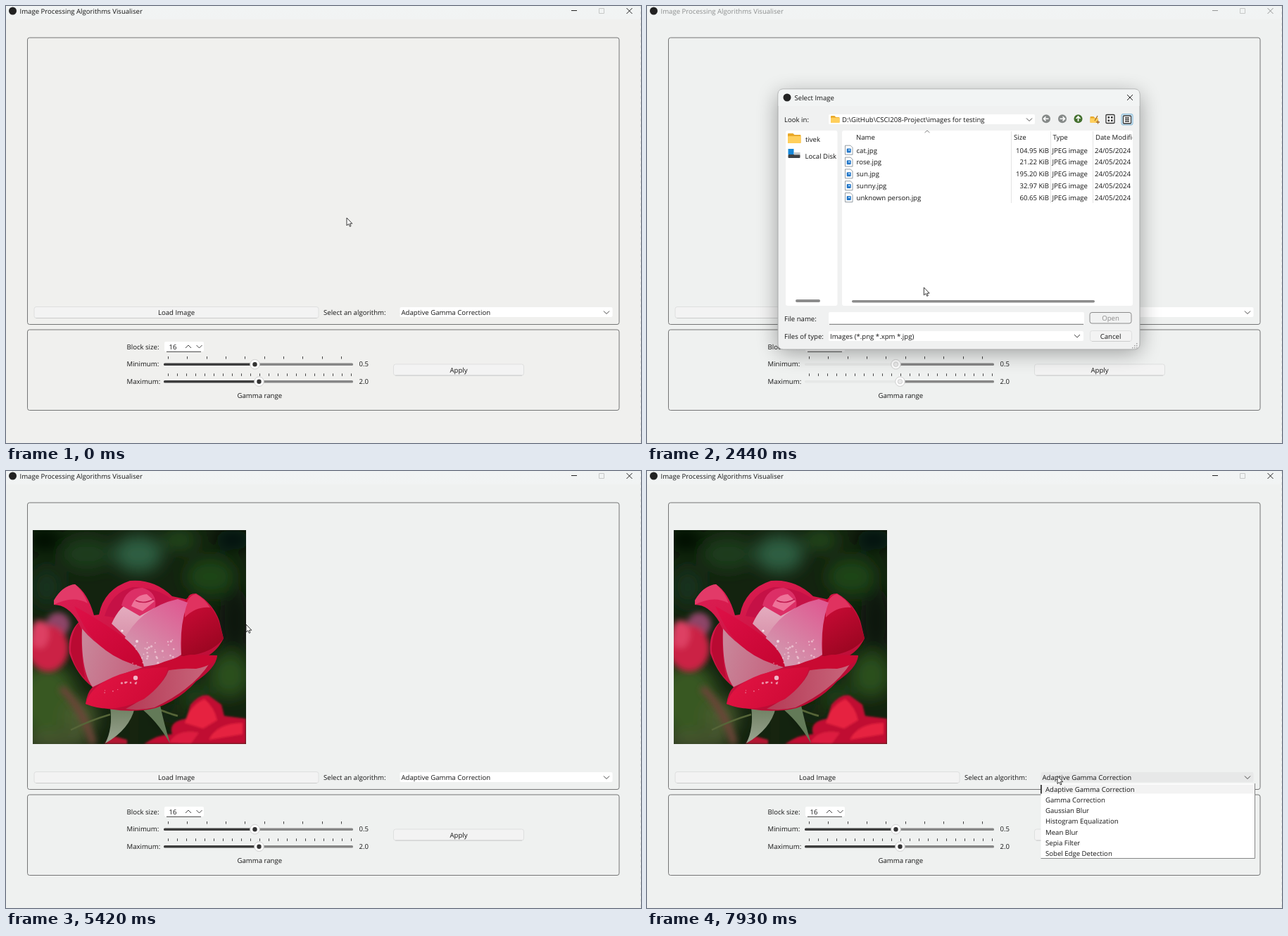
Recreate the animation shown at these times as an HTML page. Size 902 by 621 pixels, loop 8 s.

```html
<!DOCTYPE html>
<html lang="en">
<head>
<meta charset="utf-8">
<title>Image Processing Algorithms Visualiser</title>
<style>
html, body { margin: 0; width: 100%; height: 100%; overflow: hidden; background: #eff1f0; }
svg { display: block; width: 100%; height: 100%; }
text { font-family: "Open Sans", "Noto Sans", sans-serif; font-size: 9.6px; fill: #161616; text-rendering: geometricPrecision; white-space: pre; }
</style>
</head>
<body>
<svg id="stage" viewBox="0 0 902 621"></svg>
<script>
const LOOP = 8000;
const stage = document.getElementById('stage');

// Markup helpers
const text = (x, y, s, extra = '') => `<text x="${x}" y="${y}" ${extra}>${s}</text>`;
const centred = (x, y, s, extra = '') => text(x, y, s, `text-anchor="middle" ${extra}`);
const rect = (x, y, w, h, fill, extra = '') =>
  `<rect x="${x}" y="${y}" width="${w}" height="${h}" fill="${fill}" ${extra}/>`;
const circle = (x, y, r, fill, extra = '') => `<circle cx="${x}" cy="${y}" r="${r}" fill="${fill}" ${extra}/>`;
const shape = (d, fill, extra = '') => `<path d="${d}" fill="${fill}" ${extra}/>`;
const line = (d, stroke, width = 1, extra = '') =>
  `<path d="${d}" fill="none" stroke="${stroke}" stroke-width="${width}" ${extra}/>`;
const chevron = (x, y, dir = 1) => line(`M${x - 4} ${y - 2 * dir}l4 ${4 * dir}l4 ${-4 * dir}`, '#3c3c3c', .95);
const cross = (x, y) => line(`M${x - 4} ${y - 4}l8 8m0-8l-8 8`, 'currentColor', 1);
const button = (x, y, w, h, id = '') =>
  rect(x + .5, y + .5, w - 1, h - 1, '#f3f3f3', `rx="3" stroke="#dedfdf" ${id}`) +
  line(`M${x + 3} ${y + h - .5}h${w - 6}`, '#cbcccc');
const folder = (x, y, w, h) =>
  shape(`M${x} ${y + 1}q0-1 1-1h${w * .35}l2 2h${w * .65 - 4}q1 0 1 1v${h - 4}q0 1-1 1h${2 - w}q-1 0-1-1z`, '#e9a92a') +
  rect(x, y + h * .28, w, h * .72, '#ffcf5c', 'rx="1"');

function slider(y, thumb, tickY, count, step) {
  let ticks = '';
  for (let i = 0; i < count; i++) ticks += `M${Math.round(230 + i * step) + .5} ${tickY}v3.6`;
  return line(ticks, '#444') +
    rect(thumb, y - 1.7, 493 - thumb, 3.4, '#868686', 'rx="1.5"') +
    rect(224, y - 1.7, thumb - 224, 3.4, '#3d3d3d', 'rx="1.5" class="track"') +
    circle(thumb, y, 6.8, '#fdfdfd', 'stroke="#cfcfcf"') +
    circle(thumb, y, 3.2, '#333', 'class="thumb"');
}

function photo() {
  const blob = (x, y, rx, ry, fill) => `<ellipse cx="${x}" cy="${y}" rx="${rx}" ry="${ry}" fill="${fill}"/>`;
  let seed = 7, drops = '';
  const random = () => (seed = seed * 16807 % 2147483647) / 2147483647;
  for (let i = 0; i < 40; i++) {
    const low = i > 29;
    const x = low ? 140 + random() * 50 : 180 + random() * 62;
    const y = low ? 310 - (x - 140) * .35 + random() * 8 : 238 + random() * 38;
    drops += circle(x, y, .5 + random() * 1.2, '#f6d5df', 'opacity=".65"');
  }
  return `<g id="photo" clip-path="url(#photoClip)">` +
    rect(38, 84, 303, 304, '#13230f') +
    `<g filter="url(#soft)">` +
    blob(188, 118, 34, 26, '#2f5f43') + blob(246, 98, 24, 14, '#24491f') + blob(290, 150, 34, 26, '#1f4419') +
    blob(115, 118, 36, 22, '#1d3d1d') + blob(58, 165, 22, 28, '#18331a') + blob(58, 325, 42, 52, '#375820') +
    blob(105, 350, 24, 26, '#4a5a2e') + blob(318, 290, 28, 32, '#2b4f1a') + blob(270, 320, 24, 18, '#1d3c14') +
    blob(70, 384, 50, 12, '#4a5730') + blob(54, 98, 26, 18, '#050a06') + blob(325, 212, 22, 46, '#081409') +
    blob(322, 98, 26, 14, '#060d07') + blob(240, 345, 22, 14, '#14280f') + `</g><g filter="url(#slight)">` +
    blob(74, 218, 17, 17, '#8d4468') + blob(60, 252, 29, 33, '#cb2345') + blob(48, 232, 13, 20, '#dd4163') +
    line('M78 308Q108 335 124 388', '#6c4538', 10) + `</g>` +
    `<g filter="url(#faint)">` +
    shape('M196 388Q216 374 236 374Q230 356 256 352L262 332Q276 316 288 319L306 332L310 348L341 352V388Z', '#c00f30') +
    shape('M254 358Q260 334 282 324Q296 336 300 354L280 366ZM288 382Q300 358 336 358V374Z', '#e6213f') +
    shape('M232 386Q244 366 274 372L262 388Z', '#dd1b41') +
    shape('M140 388L150 376L172 382V388Z', '#b31731') + `</g>` +
    shape('M176 338H189L188 388H175Z', '#17240f') +
    line('M92 368Q120 354 148 346M215 338Q236 346 244 348', '#566538', 2.5) +
    shape('M148 336Q152 365 141 387Q176 367 183 336Z', 'url(#sepal)') +
    shape('M189 335Q214 354 233 387Q224 357 219 333Z', '#637a58') +
    // outer petals
    shape('M68 184Q80 163 98 161Q116 173 125 205L132 204Q139 168 176 156Q211 153 236 178L259 183Q257 174 270 174Q294 188 303 213L309 238Q301 254 288 262L300 263Q298 280 270 299Q246 326 212 337Q170 347 113 331Q115 315 123 307Q101 291 90 259Q87 232 103 215Q88 190 68 190Z', 'url(#petal)') +
    shape('M68 184Q80 163 98 161Q110 171 116 188Q95 176 68 190Z', '#e23a68') +
    shape('M103 216Q92 230 92 256Q98 282 112 294Q106 262 108 226Z', '#b90a32') +
    // heart of the bloom
    shape('M140 206Q150 172 180 165Q215 166 235 182L190 214Z', '#c51146') +
    shape('M150 217Q162 190 180 185L214 196L178 243Z', 'url(#pale)') +
    shape('M164 191Q170 166 194 166Q215 172 212 194L190 206Z', '#dc2f66') +
    shape('M178 192Q184 176 200 175L211 185L194 199Z', '#ee7399') +
    shape('M184 184Q196 190 210 182', 'none', 'stroke="#c01c50" stroke-width="1.5"') +
    shape('M250 190Q258 176 270 175Q292 188 302 213L309 238Q290 262 249 263Z', 'url(#dark)') +
    shape('M254 196Q258 176 270 175Q282 181 290 194Q270 192 254 208Z', '#e0325f') +
    shape('M165 244Q190 194 244 182L258 187Q246 220 249 261Q230 274 195 278Q190 255 165 244Z', 'url(#pink)') +
    shape('M108 224Q134 257 194 279Q154 291 123 307Q106 284 108 224Z', 'url(#side)') +
    shape('M97 192Q130 210 157 229Q193 253 196 279Q152 269 125 240Q110 223 97 192Z', 'url(#fold)') +
    // lower petals
    shape('M170 338Q222 310 231 283L290 272Q266 310 211 336Q190 341 170 338Z', 'url(#under)') +
    shape('M195 284Q225 268 262 261L300 262Q299 275 270 281Q240 279 212 288Z', '#c90a32') +
    shape('M113 331Q120 304 162 289Q198 278 230 279Q226 302 196 324Q151 347 113 331Z', 'url(#front)') +
    drops + circle(184, 294, 3.2, '#f0b5c6') + circle(165, 227, 1.6, '#fbe6ec') + circle(186, 242, 2, '#f3d9e2') + `</g>`;
}

function dialog() {
  const disc = (x, fill, arrow) => circle(x, 160.3, 6, fill) + line(arrow, '#fff', 1.6);
  const files = [['cat.jpg', '104.95'], ['rose.jpg', '21.22'], ['sun.jpg', '195.20'], ['sunny.jpg', '32.97'], ['unknown person.jpg', '60.65']];
  const rows = files.map(([name, size], i) => {
    const y = 204.7 + i * 16.85;
    return shape(`M281.5 ${y - 6.5}h7.5l3 3v10h-10.5z`, '#fff', 'stroke="#8a939b" stroke-width=".9"') +
      rect(283.7, y - 2.2, 6, 6, '#2377c9', 'rx="1"') + rect(286.2, y - 1, 2, 2, '#bfe1fa') +
      text(297.5, y + 3.8, name) + text(571, y + 3.8, size + ' KiB', 'text-anchor="end"') +
      text(575.5, y + 3.8, 'JPEG image') + text(636, y + 3.8, '24/05/2024');
  }).join('');
  let grip = '';
  for (let i = 0; i < 3; i++) for (let j = 0; j <= i; j++) grip += rect(695 - j * 3, 479 + i * 3, 1.5, 1.5, '#a3a3a3');

  return rect(186, 126, 514, 366, '#000', 'rx="8" opacity=".36" filter="url(#shadow)"') +
    rect(186, 118, 514, 370, '#f0f1f1', 'rx="7" stroke="#a9abab"') +
    shape('M186.5 142V125q0-6.5 6.5-6.5h500q6.5 0 6.5 6.5v17z', '#f2f4f4') +
    circle(199, 130, 5.5, '#222') + text(209.5, 134, 'Select Image') + `<g color="#222">${cross(686, 130)}</g>` +
    text(195, 165, 'Look in:') + rect(258, 154, 293, 14, '#fff', 'rx="2"') + folder(261, 156, 12.5, 10) +
    text(277, 165, 'D:\\GitHub\\CSCI208-Project\\images for testing') + chevron(543, 161.5) +
    disc(567, '#858988', 'M570.5 160.3h-7m3-3l-3 3l3 3') +
    disc(590, '#858988', 'M586.5 160.3h7m-3-3l3 3l-3 3') +
    disc(612.5, '#44702f', 'M612.5 164v-7m-3 3l3-3l3 3') +
    folder(629.5, 157, 11, 9) + line('M636 163l4-7m-2 9h5m-2.5-2.5v5', '#a96e2a', 1.3) +
    rect(652, 154.5, 12, 12, '#fff', 'rx="1" stroke="#333" stroke-width="1.3"') +
    [[654.5, 157], [659, 157], [654.5, 161.5], [659, 161.5]].map(([x, y]) => rect(x, y, 2.6, 2.6, '#333')).join('') +
    rect(674, 153.5, 16, 15.5, '#cde6f5', 'rx="2" stroke="#86b7d5"') +
    rect(676.5, 156, 11, 11, '#fff', 'rx="1" stroke="#333" stroke-width="1.3"') +
    line('M679 159h6m-6 2.5h6m-6 2.5h6', '#333', 1.3) +
    rect(197, 177, 73.5, 249, '#fff', 'rx="3"') + folder(200, 181, 18.5, 14) + text(225, 193, 'tivek') +
    rect(200.5, 203, 8, 8, '#1787d8') + rect(200.5, 211, 17, 5, '#3e4145', 'rx="1"') + rect(209, 208, 8.5, 3.5, '#c3c7ca') +
    text(224.5, 216.5, 'Local Disk') + rect(211, 417, 35, 4, '#8c8c8c', 'rx="2"') +
    rect(277, 177, 413, 249, '#fff', 'rx="3"') +
    rect(278, 197.5, 412, 14, '#f3f3f3', 'id="rowHover"') +
    line('M517.5 178v102m56-102v102m60-102v102', '#e4e4e4') +
    line('M394.5 180l3.5-3l3.5 3', '#777', .9) +
    `<g clip-path="url(#listClip)">` + text(297, 190, 'Name') + text(521, 190, 'Size') + text(576.5, 190, 'Type') +
    text(637, 190, 'Date Modified') + rows + `</g>` +
    rect(291, 418, 345, 3.6, '#8c8c8c', 'rx="1.8"') +
    text(195, 447.5, 'File name:') + rect(258, 435, 363, 17, '#fff', 'rx="2"') + line('M259 452.3h361', '#707070') +
    line('M265.7 437v14', '#111', 1, 'id="caret"') +
    rect(629, 435.5, 59, 15.5, '#f1f2f2', 'rx="3" stroke="#8b8b8b"') + centred(658.5, 447, 'Open', 'style="fill:#8b8b8b"') +
    text(195, 472.5, 'Files of type:') + rect(258, 462, 362, 14, '#fff', 'rx="2"') +
    text(260, 472.5, 'Images (*.png *.xpm *.jpg)') + chevron(611, 469) +
    button(629, 461, 60, 16) + centred(658.5, 472.5, 'Cancel') + grip;
}

function popup() {
  const items = ['Adaptive Gamma Correction', 'Gamma Correction', 'Gaussian Blur', 'Histogram Equalization', 'Mean Blur', 'Sepia Filter', 'Sobel Edge Detection'];
  return rect(559.5, 444, 304, 106.5, '#fff') + line('M863.5 444v106.5h-304', '#858686') +
    rect(561, 445.5, 302, 13, '#f3f3f3') + rect(559, 446, 1.8, 12.5, '#333') +
    items.map((s, i) => text(566, 456 + i * 15.15, s)).join('');
}

const gradient = (id, a, b, dir) =>
  `<linearGradient id="${id}" ${dir}><stop stop-color="${a}"/><stop offset="1" stop-color="${b}"/></linearGradient>`;
const blur = (id, r) => `<filter id="${id}" x="-30%" y="-30%" width="160%" height="160%"><feGaussianBlur stdDeviation="${r}"/></filter>`;

stage.innerHTML = `<defs>` +
  blur('soft', 11) + blur('slight', 4) + blur('faint', 1.5) + blur('shadow', 15) +
  gradient('bar', '#f1f4f4', '#f1f3f3', 'x2="0" y2="1"') +
  gradient('petal', '#e01f55', '#b80b32', 'x2=".6" y2="1"') +
  gradient('dark', '#d40c3a', '#9d0622', 'x2=".4" y2="1"') +
  gradient('pink', '#e0558f', '#d29bb0', 'x1="1" x2=".3" y2="1"') +
  gradient('pale', '#e6b0c2', '#d78fa8', 'x2="0" y2="1"') +
  gradient('side', '#c9899c', '#c56580', 'x2="1" y2=".3"') +
  gradient('fold', '#de1047', '#c40430', 'x2="1" y2="1"') +
  gradient('under', '#b53a55', '#c8667c', 'x2="1" y2="0"') +
  gradient('front', '#e51645', '#cf0a36', 'x2="1" y2=".4"') +
  gradient('sepal', '#6f8062', '#9ba592', 'x2="0" y2="1"') +
  `<clipPath id="photoClip"><rect x="38" y="84" width="303" height="304"/></clipPath>` +
  `<clipPath id="listClip"><rect x="277" y="177" width="412.5" height="240"/></clipPath>` +
  `<clipPath id="popupClip"><rect id="popupWindow" x="558" y="443" width="308" height="109"/></clipPath></defs>` +
  rect(0, 0, 902, 621, '#f0f0ee', 'id="back"') + rect(0, 0, 902, 19, 'url(#bar)') +
  line('M901.5 0V621', '#dfe1e0', 1, 'stroke-dasharray="4 4"') +
  circle(9.5, 7, 5.5, '#222') + text(19.5, 11, 'Image Processing Algorithms Visualiser', 'id="title"') +
  `<g id="controls">${line('M803 6.5h8', 'currentColor')}${cross(885.5, 7)}</g>` +
  line('M842.5 3.5h7v7h-7z', '#c6c8c7') +
  `<g fill="none" stroke="#747575"><rect x="30.5" y="45" width="840.5" height="407.5" rx="3"/>` +
  `<rect x="30.5" y="460" width="840.5" height="114.5" rx="3"/></g>` +
  photo() +
  button(39.5, 427, 405, 17, 'id="load"') + centred(242, 439, 'Load Image', 'id="loadText"') +
  text(451, 439, 'Select an algorithm:') + rect(559.5, 428, 302, 14, '#fff', 'rx="2" id="combo"') +
  text(561.5, 439, 'Adaptive Gamma Correction') + chevron(853, 435.5) +
  text(171.5, 487.5, 'Block size:') + rect(225, 477, 56, 14, '#fff', 'rx="2"') + line('M228 491.3h49', '#444') +
  text(231.5, 488, '16') + chevron(259, 484, -1) + chevron(274.5, 484) +
  text(171.5, 512, 'Minimum:') + slider(509.2, 353.5, 498, 10, 27.35) + text(501.5, 512, '0.5') +
  text(171.5, 537, 'Maximum:') + slider(533.7, 359.5, 522.3, 21, 13.02) + text(501.5, 537, '2.0') +
  centred(360.3, 557, 'Gamma range') + button(550, 508.5, 186, 17) + centred(643, 521.3, 'Apply') +
  text(1.5, 621.5, '', 'id="status"') +
  `<g id="dialog">${dialog()}</g><g id="popup" clip-path="url(#popupClip)">${popup()}</g>` +
  shape('M0 0V11L2.6 8.7L4.4 12.4L6 11.7L4.4 8.2H7.8Z', '#fff', 'id="cursor" stroke="#222" stroke-width=".9" stroke-linejoin="round"');

const el = {};
stage.querySelectorAll('[id]').forEach(node => el[node.id] = node);
const tracks = stage.querySelectorAll('.track'), thumbs = stage.querySelectorAll('.thumb');

const clamp = v => Math.max(0, Math.min(1, v));
const progress = (t, a, b) => clamp((t - a) / (b - a));
const within = (t, a, b) => t >= a && t < b;
const show = (node, on) => node.setAttribute('visibility', on ? 'visible' : 'hidden');
const set = (node, name, value) => node.setAttribute(name, value);

// Pointer stops: time, x, y
const stops = [[0, 484, 301], [310, 484, 301], [1110, 403, 420], [1240, 399, 431.5], [2320, 399, 431.5], [2730, 372, 281],
  [2990, 372, 281], [3700, 342, 212], [3820, 342, 212], [3910, 341, 218], [6395, 341, 218], [6410, 343, 218],
  [6770, 509, 347], [6970, 509, 347], [7510, 583, 433.5], [LOOP, 583, 433.5]];

function pointer(t) {
  const i = stops.findIndex(s => s[0] > t);
  const [t0, x0, y0] = stops[i - 1], [t1, x1, y1] = stops[i];
  const p = progress(t, t0, t1), e = p * p * (3 - 2 * p);
  return [x0 + (x1 - x0) * e, y0 + (y1 - y0) * e];
}

function render(t) {
  const [x, y] = pointer(t);
  set(el.cursor, 'transform', `translate(${x} ${y})`);

  const inactive = within(t, 1640, 4300), muted = within(t, 1640, 5420);
  set(el.back, 'fill', t < 1640 ? '#f0f0ee' : '#eff1f0');
  el.title.style.fill = inactive ? '#8d8f8f' : '#161616';
  set(el.controls, 'color', inactive ? '#949696' : '#222');
  tracks.forEach(n => set(n, 'fill', muted ? '#e6e8e7' : '#3d3d3d'));
  thumbs.forEach(n => {
    set(n, 'fill', muted ? '#ebebeb' : '#333');
    set(n, 'stroke', muted ? '#cfcfcf' : 'none');
  });

  const overLoad = t < 1640 && y >= 427, overCombo = t > 7000 && y >= 428;
  const pressed = within(t, 1470, 1620);
  set(el.load, 'fill', pressed ? '#f0f0ef' : overLoad ? '#f5f5f4' : '#f3f3f3');
  el.loadText.style.fill = pressed ? '#626262' : '#161616';
  set(el.combo, 'fill', overCombo ? '#e7e8e8' : '#fff');
  el.status.textContent = overLoad && t < 1620 ? 'Load an image from drive.'
    : overCombo && t < 7730 ? 'Select an algorithm.' : '';

  const opening = progress(t, 1640, 1920), closing = progress(t, 4230, 4440);
  const scale = 1 - .125 * (1 - opening) ** 3 - .1 * closing * closing;
  show(el.dialog, opening > 0 && closing < 1);
  set(el.dialog, 'opacity', clamp(opening * 3) * (1 - closing));
  set(el.dialog, 'transform', `translate(443 303) scale(${scale}) translate(-443 -303)`);
  const row = Math.floor((y - 196) / 16.85);
  set(el.rowHover, 'opacity', row >= 0 && row < 5 ? 1 : 0);
  set(el.rowHover, 'y', 197.5 + row * 16.85);
  set(el.caret, 'opacity', Math.floor((t - 1640) / 514) % 2 === 0 ? 1 : 0);

  show(el.photo, t >= 5420);
  show(el.popup, t >= 7730);
  set(el.popupWindow, 'height', 109 * (.35 + .65 * progress(t, 7730, 7920)));
}

const start = performance.now();
function tick() {
  render((performance.now() - start) % LOOP);
  requestAnimationFrame(tick);
}
tick();
</script>
</body>
</html>
```
